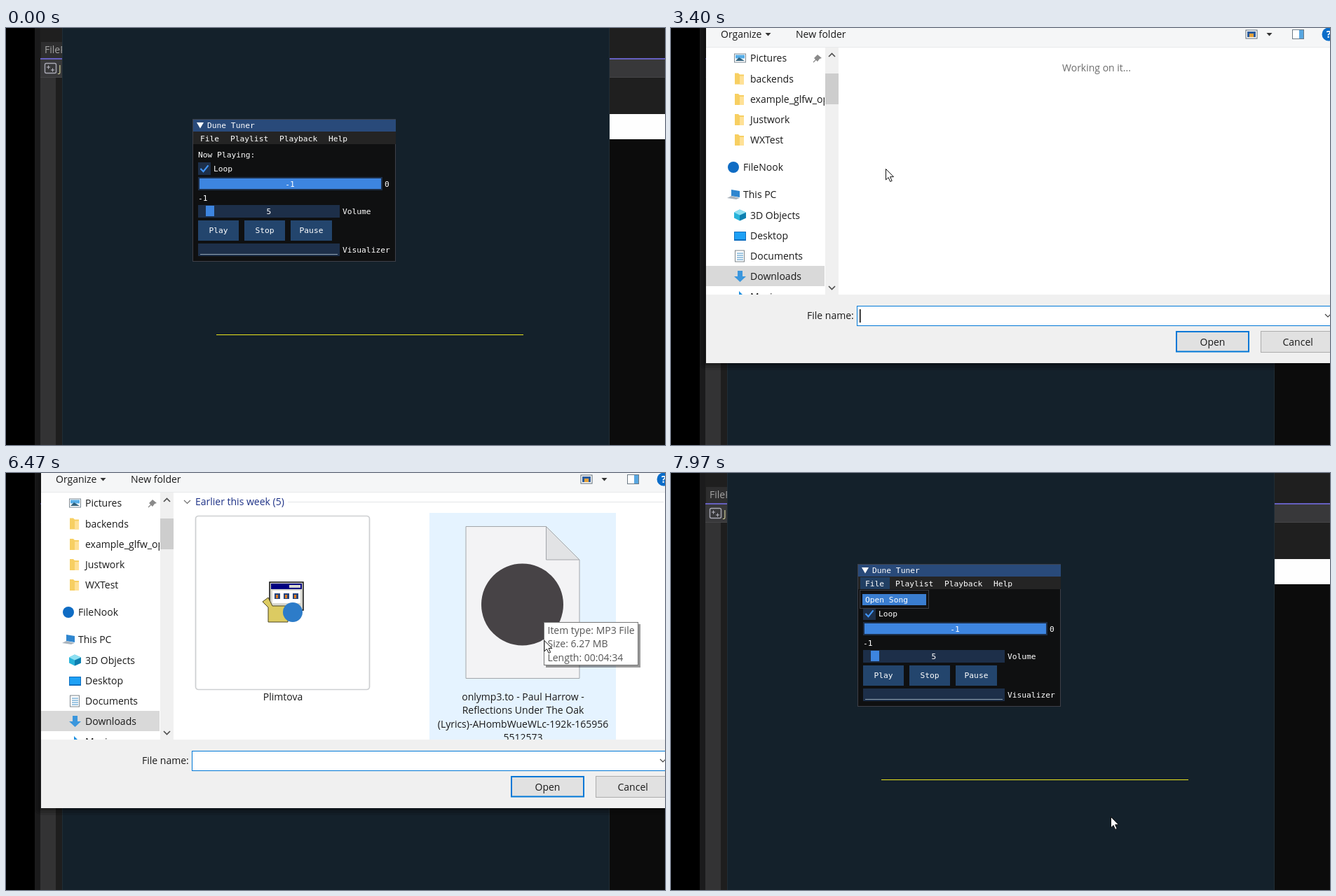
An HTML page that plays this animation: 940x596 px, repeating every 7.99 s.

```html
<!DOCTYPE html>
<html lang="en">
<head>
<meta charset="utf-8">
<title>Music player</title>
<style>
html, body { margin: 0; width: 100%; height: 100%; overflow: hidden; background: #000; }
svg { display: block; width: 940px; height: 596px; }
text { white-space: pre; }
.ui { font: 14px "Open Sans", "Noto Sans", sans-serif; fill: #1a1a1a; }
.mono { font: 11.25px "DejaVu Sans Mono", "Noto Sans Mono", monospace; fill: #fff; }
.code { font: 6.2px "DejaVu Sans Mono", monospace; fill: #c9cdc4; }
.mid { text-anchor: middle; }
.tip text { fill: #575757; }
</style>
</head>
<body>
<svg id="stage" viewBox="0 0 940 596" xmlns="http://www.w3.org/2000/svg"></svg>
<script>
const LOOP = 7990;
const SONG = "onlymp3.to - Paul Harrow - Reflections Under The Oak (Lyrics)-AHombWueWLc-192k-1659565512573";

const rect = (x, y, w, h, fill, more = "") =>
  `<rect x="${x}" y="${y}" width="${w}" height="${h}" fill="${fill}" ${more}/>`;
const path = (d, fill, more = "") => `<path d="${d}" fill="${fill}" ${more}/>`;
const line = (d, color, width = 1, more = "") =>
  path(d, "none", `stroke="${color}" stroke-width="${width}" ${more}`);
const esc = s => s.replace(/&/g, "&amp;").replace(/</g, "&lt;");
const text = (cls, x, y, s, more = "") =>
  `<text class="${cls}" x="${x}" y="${y}" ${more}>${esc(s)}</text>`;
const ui = (x, y, s, more) => text("ui", x, y, s, more);
const mono = (x, y, s, more) => text("mono", x, y, s, more);
const group = (id, body, more = "") => `<g id="${id}" ${more}>${body}</g>`;

function desktop() {
  return rect(0, 0, 940, 596, "#000") + rect(41, 0, 899, 596, "#1f1f1f") +
    rect(41, 0, 8, 596, "#1b1b1c") +
    rect(50, 20, 40, 23, "#2e2e2f") + ui(55, 36, "FileP", 'style="fill:#a3a3a3"') +
    rect(49, 43, 891, 2, "#6660c0") + rect(49, 45, 891, 25, "#38383a") +
    rect(49, 70, 891, 1, "#454547") +
    rect(55.5, 50.5, 16, 14, "none", 'rx="2" stroke="#a9a9b4" stroke-width="1.4"') +
    line("M58 56h5M60.5 53.5v5M64 60h5M66.5 57.5v5", "#b9b9c4") +
    ui(75, 63, "J", 'style="fill:#cfcf9a"') +
    rect(49, 71, 22, 525, "#333334") + rect(71, 71, 10, 525, "#1e1e1e") +
    rect(861, 123, 79, 36, "#fefefe") + rect(861, 159, 79, 437, "#0c0c0c") +
    rect(80, 0, 781, 596, "#202d36") + rect(81, 0, 779, 596, "#14212b") +
    rect(300, 438, 438, 1, "#e9e41e");
}

function player() {
  const frame = "#1d2f49", accent = "#3d85e0";
  const button = (x, w, s) => rect(x, 275, w, 29, "#23456d") +
    text("mono mid", x + w / 2, 293, s);
  return rect(266.5, 130.5, 289, 203, "#0f1011", 'stroke="#3e4048"') +
    rect(267, 131, 289, 17, "#294a7a") + rect(267, 148, 289, 18, "#242424") +
    path("M272 135h10l-5 8.5z", "#fff") + mono(287, 143, "Dune Tuner") +
    rect(270, 149, 42, 17, "none", 'id="fileBg"') +
    [[277, "File"], [320, "Playlist"], [390, "Playback"], [460, "Help"]]
      .map(([x, s]) => mono(x, 162, s)).join("") +
    mono(274, 185, "Now Playing:") +
    rect(274, 192, 18, 18, frame) + line("M277.5 201l4 4.2 7-8.8", "#4296fa", 2.2) +
    mono(296, 205, "Loop") +
    rect(274, 213, 263, 19, frame) + rect(276, 215, 259, 15, accent) +
    text("mono mid", 405, 227, "-1") + mono(540, 227, "0") + mono(274, 247, "-1") +
    rect(274, 253, 202, 18, frame) + rect(285, 254, 12, 15, accent) +
    text("mono mid", 375, 266, "5") + mono(480, 266, "Volume") +
    button(274, 58, "Play") + button(340, 58, "Stop") + button(406, 59, "Pause") +
    rect(274, 308, 202, 18, frame) + rect(277, 323, 196, 1, "#91a3b3") +
    mono(480, 321, "Visualizer") +
    group("menu", rect(269.5, 167.5, 98, 26, "#111214", 'fill-opacity=".94" stroke="#3e4048"') +
      rect(273, 173, 91, 16, "#3a7dd0", 'id="songBg"') + mono(277, 185, "Open Song"));
}

const icons = {
  pic: y => rect(90.5, y - 6, 16, 12, "#fff", 'stroke="#7d8a94"') +
    rect(92, y - 4.5, 13, 5, "#57aee8") + path(`M92 ${y + 4}l5-5 8 5z`, "#31617c"),
  folder: y => path(`M91 ${y - 8}h5l2 2h6v14h-13z`, "#f7cf62") + rect(98, y - 4, 6, 12, "#ffe196"),
  pc: y => path(`M86 ${y - 7}l12 2v9l-12-2z`, "#2f86cf") + path(`M80 ${y + 5}l6-3 12 3-5 2z`, "#aab4bd"),
  cube: y => path(`M98 ${y - 8}l9 4v8l-9 4-8-4v-8z`, "#28b4da") +
    path(`M98 ${y}l9-4v8l-9 4z`, "#0d7fb0") + path(`M98 ${y - 8}l9 4-9 4-8-4z`, "#8fe0f2"),
  desk: y => rect(90, y - 6, 17, 13, "#0f6fc0") + rect(91, y - 5, 15, 10, "#1ea1f5"),
  doc: y => rect(91.5, y - 8, 13, 16, "#fff", 'stroke="#7d868c"') +
    line(`M94 ${y - 4}h9M94 ${y - 1}h9M94 ${y + 2}h9M94 ${y + 5}h9`, "#3b8cc4"),
  down: y => path(`M95 ${y - 8}h7v8h5l-8.5 8-8.5-8h5z`, "#3b97dd"),
  note: y => path(`M97 ${y - 8}l6 6v3l-4-3v9h-4v-4h2z`, "#1d8fe0"),
  dot: y => `<circle cx="89" cy="${y}" r="8" fill="#0f6cc4"/>`
};

function sidebar() {
  const rows = [
    [43, 113, "Pictures", "pic"], [72.5, 113, "backends", "folder"],
    [102, 113, "example_glfw_opengl", "folder"], [131, 113, "Justwork", "folder"],
    [160, 113, "WXTest", "folder"], [199, 103, "FileNook", "dot"],
    [238, 103, "This PC", "pc"], [267.5, 113, "3D Objects", "cube"],
    [297, 113, "Desktop", "desk"], [326, 113, "Documents", "doc"],
    [355, 113, "Downloads", "down"], [384, 113, "Music", "note"]
  ];
  return `<g clip-path="url(#sideClip)">` + rect(50, 340, 169, 29, "#d9d9d9") +
    rows.map(([y, x, s, icon]) => icons[icon](y) + ui(x, y + 5, s)).join("") +
    path("M204 43l5-5 6 5-3 1-3 4z", "#8a8a8a") + line("M203 49l4-4", "#8a8a8a", 1.3) + "</g>" +
    rect(220, 28, 19, 353, "#f0f0f0") + rect(220, 65, 19, 44, "#cdcdcd") +
    line("M225 41l4.5-4.5 4.5 4.5M225 369l4.5 4.5 4.5-4.5", "#505050", 1.7);
}

function setupIcon() {
  return rect(376, 156, 48, 40, "#d8d8d0", 'stroke="#111" stroke-width="1.5"') +
    rect(378, 158, 44, 8, "#000080") + rect(404, 160, 16, 4, "#d8d8d0") +
    rect(380, 168, 40, 18, "#fff") +
    [383, 396, 409].map(x => rect(x, 172, 8, 8, "#27457d") + rect(x + 2, 174, 3, 5, "#e07b1f")).join("") +
    path("M366 184l8-6 6 12h22v23h-28v-21z", "#dccb62", 'stroke="#4a4420"') +
    `<circle cx="409" cy="199" r="14" fill="#2d7cc9"/>`;
}

function snippet() {
  const rows = ["#include <iostream>", "template<typename T>", "T sum(T a, T b) {", "",
    "    T result = a + b;", "    return result;", "}", "int main()", "{", "",
    "    std::cout << sum<float>(3.0,4.16);", "    return 0;", "}"];
  const tint = ["#d97a6c", "#c9cdc4", "#d6b36a"];
  const ys = i => 487 + i * 8.55 - (i > 9 ? 8.55 : 0);
  return rect(618, 424, 240, 217, "#000", 'opacity=".18"') + rect(616, 421, 239, 217, "#b7e785") +
    rect(647, 452, 174, 153, "#1f2422", 'rx="3"') +
    [659, 670, 681].map(x => `<circle cx="${x}" cy="465" r="3.5" fill="none" stroke="#8b908d"/>`).join("") +
    rows.map((s, i) => s && text("code", 656, ys(i), s, `style="fill:${tint[i % 3]}"`)).join("");
}

function files() {
  const label = (x, y, s) => text("ui mid", x, y, s);
  const thumb = y => rect(270.5, y, 248, 248, "none", 'rx="4" stroke="#cdcfd1" stroke-width="1.7"');
  const name = ["onlymp3.to - Paul Harrow -", "Reflections Under The Oak",
    "(Lyrics)-AHombWueWLc-192k-165956", "5512573"];
  return [[262, 57], [604, 57], [262, 392], [604, 392]]
      .map(([x, y], i) => rect(x, y, 266, 333, "none", `id="item${i}"`)).join("") +
    line("M254 39l4.5 4.5 4.5-4.5", "#6d6d6d", 1.2) +
    ui(270, 46, "Earlier this week (5)", 'style="fill:#1e3287"') + rect(402, 41, 536, 1, "#e3e5e8") +
    thumb(61.5) + setupIcon() + label(395, 325, "Plimtova") +
    path("M656 76.5h114.5l47.5 47.5v169.5h-162z", "#f3f3f5", 'stroke="#a3a6aa"') +
    path("M770.5 76.5v47.5h47.5z", "#e2e3e5", 'stroke="#a3a6aa"') +
    `<circle cx="736.5" cy="188" r="58.5" fill="#474346"/>` +
    name.map((s, i) => label(737.5, 325 + i * 19.4, s)).join("") +
    thumb(395.5) + rect(365, 491, 59, 58, "#3c8f45", 'rx="9"') + label(395.5, 660, "test") + snippet();
}

function tooltip(id, x, y, w, h, rows) {
  return group(id, rect(x + 3, y + 3, w, h, "#000", 'opacity=".4"') +
    rect(x + .5, y + .5, w - 1, h - 1, "#fff", 'stroke="#767676"') +
    rows.map((s, i) => ui(x + 5.5, y + 17 + i * 19.45, s)).join(""), 'class="tip"');
}

function dialog() {
  const shadow = [10, 7, 4, 2].map(d =>
    rect(50 - d, -40, 960, 519 + d, "#000", `rx="${d}" opacity=".12"`)).join("");
  return shadow + rect(50, -40, 960, 519, "#f0f0f0") +
    rect(50, -40, 960, 67, "#f5f6f7") + rect(50, 27, 960, 354, "#fff") + rect(50, 27, 960, 1, "#e8eaec") +
    ui(71, 14, "Organize") + path("M134.5 7h8l-4 4.5z", "#333") + ui(178, 14, "New folder") +
    rect(820, 3, 16, 12, "#fff", 'stroke="#5d6a75"') + rect(822, 5, 12, 8, "#2b5b9c") +
    rect(825, 8, 6, 5, "#e4a13a") + path("M849.5 7h8l-4 4.5z", "#333") +
    rect(886.5, 2.5, 16, 13, "#fff", 'stroke="#6d7a85"') + rect(896, 3, 6, 12, "#58a6e0") +
    `<circle cx="938" cy="9" r="9.5" fill="#0a6cc9"/>` +
    text("ui mid", 938, 14, "?", 'style="fill:#fff;font-weight:700"') +
    sidebar() + ui(558, 62, "Working on it...", 'id="busy" style="fill:#6d6d6d"') +
    `<g id="pane" clip-path="url(#paneClip)">${group("list", files())}</g>` +
    ui(194, 416, "File name:") +
    rect(265.5, 397.5, 720, 28, "#fff", 'id="combo" stroke="#0078d7"') +
    rect(269, 401, 650, 21, "#0078d7", 'id="songSel"') + ui(270, 416, SONG, 'id="songName"') +
    rect(926, 400, 40, 23, "#fff") + line("M933 409l4 4 4-4", "#444", 1.2) +
    rect(269, 402, 1.5, 19, "#000", 'id="caret"') +
    rect(721, 434, 103, 28.5, "#e1e1e1", 'id="open" stroke="#0078d7" stroke-width="2"') +
    text("ui mid", 772.5, 454, "Open") +
    rect(841.5, 433.5, 120, 30, "#e1e1e1", 'stroke="#adadad"') + ui(872.5, 454, "Cancel");
}

const stage = document.getElementById("stage");
stage.innerHTML =
  `<defs><clipPath id="sideClip">${rect(50, 28, 169, 353, "#000")}</clipPath>
   <clipPath id="paneClip">${rect(240, 28, 720, 353, "#000")}</clipPath></defs>` +
  desktop() + player() + group("dialog", dialog()) +
  tooltip("tipA", 499, 287, 303, 121, ["Plimtova", "File description: Basic Package Self-Installer",
    "Company: Brantmoor Corporation", "File version: 6.0.2600.0",
    "Date created: 2022-09-12 10:54 PM", "Size: 2.37 MB"]) +
  tooltip("tipB", 767, 213, 135, 62, ["Item type: MP3 File", "Size: 6.27 MB", "Length: 00:04:34"]) +
  group("cursor", path("M.5.5v15.5l3.6-3.4 2.6 5.9 2.5-1.1-2.6-5.7h4.9z", "#fff",
    'stroke="#111" stroke-width="1"'));

const el = {};
stage.querySelectorAll("[id]").forEach(n => el[n.id] = n);
const set = (id, name, value) => el[id].setAttribute(name, value);
const show = (id, on) => { el[id].style.display = on ? "" : "none"; };
const fade = (id, a) => { show(id, a > 0); set(id, "opacity", a); };
set("songSel", "width", el.songName.getComputedTextLength() + 2);

const ramp = (t, a, b) => Math.min(1, Math.max(0, (t - a) / (b - a)));
const smooth = p => p * p * (3 - 2 * p);

// Keys are [time, ...values]; values ease from one key to the next.
function track(keys, t) {
  let i = 0;
  while (i < keys.length - 2 && t >= keys[i + 1][0]) i++;
  const [a, b] = [keys[i], keys[i + 1]];
  const p = smooth(ramp(t, a[0], b[0]));
  return a.slice(1).map((v, k) => v + (b[k + 1] - v) * p);
}

const pointer = [
  [250, 868, 560], [1040, 292, 130], [1190, 286, 154], [1700, 286, 154], [2030, 295, 172],
  [2250, 295, 172], [2950, 306, 201], [3870, 306, 201], [4580, 499, 268], [5560, 499, 268],
  [6100, 767, 194], [6400, 767, 194], [6560, 768, 302], [6600, 768, 302], [6900, 773, 441],
  [7640, 773, 441], [7970, 627, 491]
];
const scrolling = [
  [4670, 0], [5110, 287], [5380, 287], [5900, 0], [6580, 0], [6700, 10.5]
];

function draw(t) {
  const [x, y] = track(pointer, t);
  const [scroll] = track(scrolling, t);
  show("cursor", t >= 250);
  set("cursor", "transform", `translate(${x} ${y})`);

  const menuOpen = t >= 1390;
  const onFile = x >= 270 && x < 312 && y >= 148 && y < 167;
  set("fileBg", "fill", onFile ? "#3a7dd0" : menuOpen ? "#213f63" : "none");
  show("menu", menuOpen);
  show("songBg", t >= 1940);

  const opening = smooth(ramp(t, 2950, 3180)), closing = ramp(t, 7315, 7500);
  const scale = 1 - .04 * (1 - opening) - .0424 * closing;
  fade("dialog", opening * (1 - closing));
  set("dialog", "transform", `translate(447 205) scale(${scale}) translate(-447 -205)`);

  const loaded = t >= 3870, picked = t >= 6580, pressed = t >= 6970;
  show("busy", !loaded);
  show("pane", loaded);
  set("list", "transform", `translate(0 ${-scroll})`);
  for (let i = 0; i < 4; i++) {
    const left = i % 2 ? 604 : 262, top = (i < 2 ? 57 : 392) - scroll;
    const over = x >= left && x < left + 266 && y >= top && y < top + 333 && y > 28 && y < 381;
    set("item" + i, "fill", i === 1 && picked ? (pressed ? "#d9d9d9" : "#cce8ff") : over ? "#e5f3ff" : "none");
  }

  show("songName", picked);
  show("songSel", pressed);
  el.songName.style.fill = pressed ? "#fff" : "#1a1a1a";
  set("combo", "stroke", pressed ? "#7a7a7a" : "#0078d7");
  show("caret", t >= 3340 && !picked && Math.floor((t - 3340) / 530) % 2 === 0);
  const onOpen = x >= 720 && x < 825 && y >= 433 && y < 463;
  set("open", "fill", pressed ? "#cce4f7" : onOpen ? "#e5f1fb" : "#e1e1e1");
  set("open", "stroke", pressed ? "#005499" : "#0078d7");
  set("open", "stroke-width", pressed ? 1 : 2);

  show("tipA", t >= 5300 && t < 5440);
  fade("tipB", ramp(t, 6300, 6400) * (1 - ramp(t, 6560, 6600)));
}

const start = performance.now();
function tick() {
  draw((performance.now() - start) % LOOP);
  requestAnimationFrame(tick);
}
tick();
</script>
</body>
</html>
```
